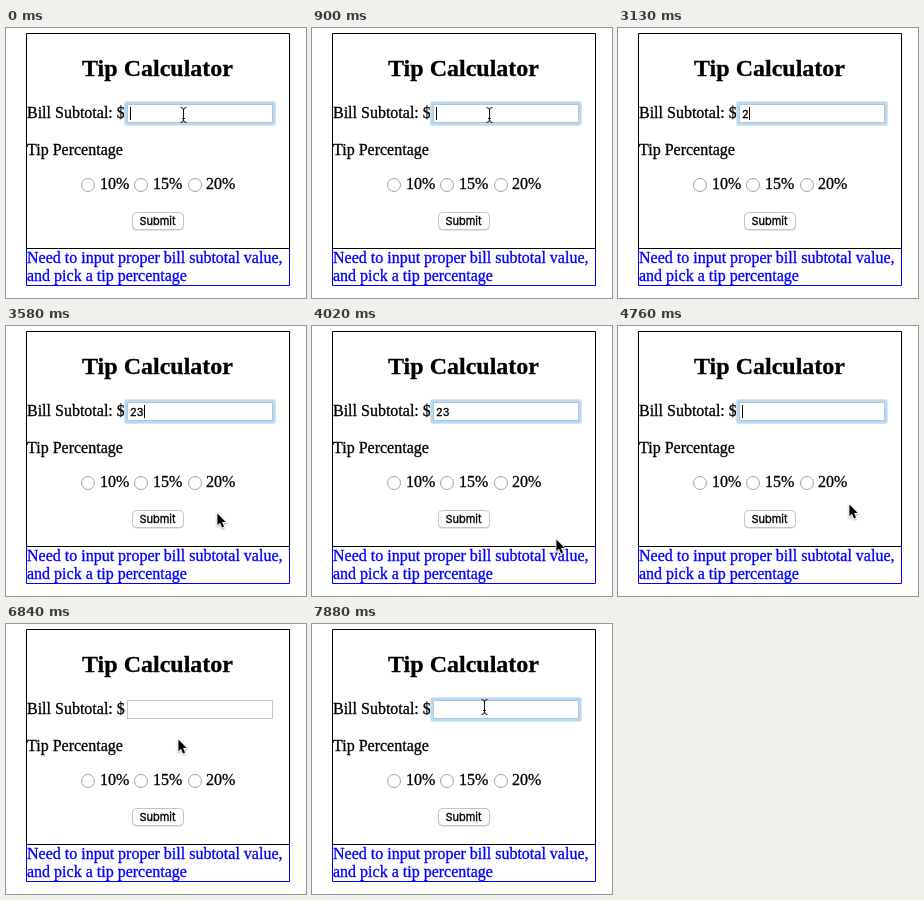
Recreate the animation shown at these times as an HTML page with a canvas. Size 300 by 270 pixels, loop 8 s.

```html
<!DOCTYPE html>
<html lang="en">
<head>
<meta charset="utf-8">
<title>Tip Calculator</title>
<style>
  html, body { margin: 0; width: 100%; height: 100%; overflow: hidden; background: #fff; }
  canvas { display: block; width: 300px; height: 270px; }
</style>
</head>
<body>
<canvas id="stage"></canvas>
<script>
const LOOP = 8000;
const BLUE = '#00f';
const SERIF = '"Liberation Serif", "Times New Roman", serif';
const SANS = 'Inter, "Liberation Sans", sans-serif';

const canvas = document.getElementById('stage');
const ctx = canvas.getContext('2d');
const scale = window.devicePixelRatio || 1;
canvas.width = 300 * scale;
canvas.height = 270 * scale;

// Each track holds its value until the next key time.
const caretTrack = [
  [0, 1], [450, 0], [900, 1], [1500, 0], [1940, 1], [2530, 0], [2980, 1],
  [4020, 0], [4470, 1], [5050, 0], [5490, 1], [5790, 0], [7290, 1], [7880, 0]
];
const focusTrack = [[0, 1], [5790, 0], [7290, 1]];
const valueTrack = [[0, ''], [3130, '2'], [3280, '23'], [4320, '']];
const pointerTrack = [
  [0, ['beam', 177, 87]], [1650, null],
  [3430, ['arrow', 192, 150]], [3580, ['arrow', 211, 187]],
  [3730, ['arrow', 281, 206]], [3880, ['arrow', 262, 212]],
  [4020, ['arrow', 244, 213]], [4760, ['arrow', 231, 178]],
  [4910, ['arrow', 212, 178]], [5050, ['arrow', 190, 182]],
  [5200, ['arrow', 170, 187]], [5340, ['arrow', 157, 190]],
  [5490, ['arrow', 152, 190]], [6840, ['arrow', 172, 115]],
  [6990, ['beam', 172, 88]], [7140, ['beam', 172, 83]]
];

function at(track, t) {
  let value = track[0][1];
  for (const [time, v] of track) if (t >= time) value = v;
  return value;
}

// A hairline stroke gives the slightly heavy look of smoothed screen type.
function text(str, x, y, font, color = '#000', align = 'left') {
  ctx.font = font;
  ctx.fillStyle = ctx.strokeStyle = color;
  ctx.textAlign = align;
  ctx.lineWidth = 0.3;
  ctx.lineJoin = 'round';
  ctx.fillText(str, x, y);
  ctx.strokeText(str, x, y);
}

function rect(x, y, w, h, color) {
  ctx.fillStyle = color;
  ctx.fillRect(x, y, w, h);
}

function rounded(x, y, w, h, r, fill, stroke) {
  ctx.beginPath();
  ctx.roundRect(x, y, w, h, r);
  ctx.fillStyle = fill;
  ctx.fill();
  if (stroke) {
    ctx.strokeStyle = stroke;
    ctx.lineWidth = 1;
    ctx.stroke();
  }
}

function frame(x, y, w, h, color) {
  ctx.strokeStyle = color;
  ctx.lineWidth = 1;
  ctx.strokeRect(x + 0.5, y + 0.5, w - 1, h - 1);
}

function radio(x, label, labelX) {
  ctx.beginPath();
  ctx.arc(x, 157, 6.5, 0, Math.PI * 2);
  ctx.fillStyle = '#fff';
  ctx.fill();
  ctx.strokeStyle = '#a3a3a3';
  ctx.lineWidth = 1;
  ctx.stroke();
  text(label, labelX, 161, '16px ' + SERIF);
}

function field(focused, value, caret) {
  if (focused) {
    rounded(118, 73, 152, 25, 3, '#d3e6f9');
    rounded(119, 74, 150, 23, 2, '#b9d8f4');
  }
  rect(121, 76, 146, 19, '#fff');
  frame(121, 76, 146, 19, focused ? '#b4c4d0' : '#c6c6c6');
  const font = '11px ' + SANS;
  text(value, 124, 90, font);
  if (caret) {
    ctx.font = font;
    rect(124 + Math.round(ctx.measureText(value).width), 79, 1, 13, '#000');
  }
}

function button() {
  rounded(126.5, 185, 51, 17.5, 4, '#d0d0d0');
  rounded(126.5, 184.5, 51, 17, 4, '#fff', '#c4c4c4');
  text('Submit', 151.5, 197, '11px ' + SANS, '#000', 'center');
}

function arrow(x, y) {
  ctx.save();
  ctx.translate(x, y + 0.5);
  ctx.scale(0.84, 0.84);
  ctx.beginPath();
  ctx.moveTo(0.5, 0);
  for (const [px, py] of [[0.5, 14], [3.6, 11], [6, 16.6], [8.4, 15.6], [6, 10.2], [10.4, 10.2]]) {
    ctx.lineTo(px, py);
  }
  ctx.closePath();
  ctx.lineJoin = 'round';
  ctx.strokeStyle = '#fff';
  ctx.lineWidth = 2;
  ctx.shadowColor = 'rgba(0,0,0,.35)';
  ctx.shadowBlur = 2 * scale;
  ctx.shadowOffsetY = scale;
  ctx.stroke();
  ctx.shadowColor = 'transparent';
  ctx.fillStyle = '#000';
  ctx.fill();
  ctx.restore();
}

function beam(x, y) {
  ctx.save();
  ctx.translate(x + 0.5, y);
  ctx.beginPath();
  for (const s of [-1, 1]) {
    ctx.moveTo(-3, 7.5 * s);
    ctx.quadraticCurveTo(0, 7.5 * s, 0, 5 * s);
    ctx.quadraticCurveTo(0, 7.5 * s, 3, 7.5 * s);
  }
  ctx.moveTo(0, -6);
  ctx.lineTo(0, 6);
  ctx.moveTo(-1.5, 3.5);
  ctx.lineTo(1.5, 3.5);
  ctx.strokeStyle = '#111';
  ctx.lineWidth = 1;
  ctx.stroke();
  ctx.restore();
}

const pointers = { arrow, beam };

function draw(t) {
  ctx.setTransform(scale, 0, 0, scale, 0, 0);
  rect(0, 0, 300, 270, '#fff');

  frame(20, 220, 264, 38, BLUE);
  frame(20, 5, 264, 216, '#000');
  text('Tip Calculator', 151.5, 48, 'bold 24px ' + SERIF, '#000', 'center');
  text('Bill Subtotal: $', 21, 90, '16px ' + SERIF);
  text('Tip Percentage', 21, 127, '16px ' + SERIF);
  field(at(focusTrack, t), at(valueTrack, t), at(caretTrack, t));

  radio(82, '10%', 94);
  radio(135, '15%', 147);
  radio(189, '20%', 200);
  button();

  text('Need to input proper bill subtotal value,', 21, 235, '16px ' + SERIF, BLUE);
  text('and pick a tip percentage', 21, 253, '16px ' + SERIF, BLUE);

  const pointer = at(pointerTrack, t);
  if (pointer) pointers[pointer[0]](pointer[1], pointer[2]);
}

const start = performance.now();
function tick() {
  draw((performance.now() - start) % LOOP);
  requestAnimationFrame(tick);
}
tick();
</script>
</body>
</html>
```
